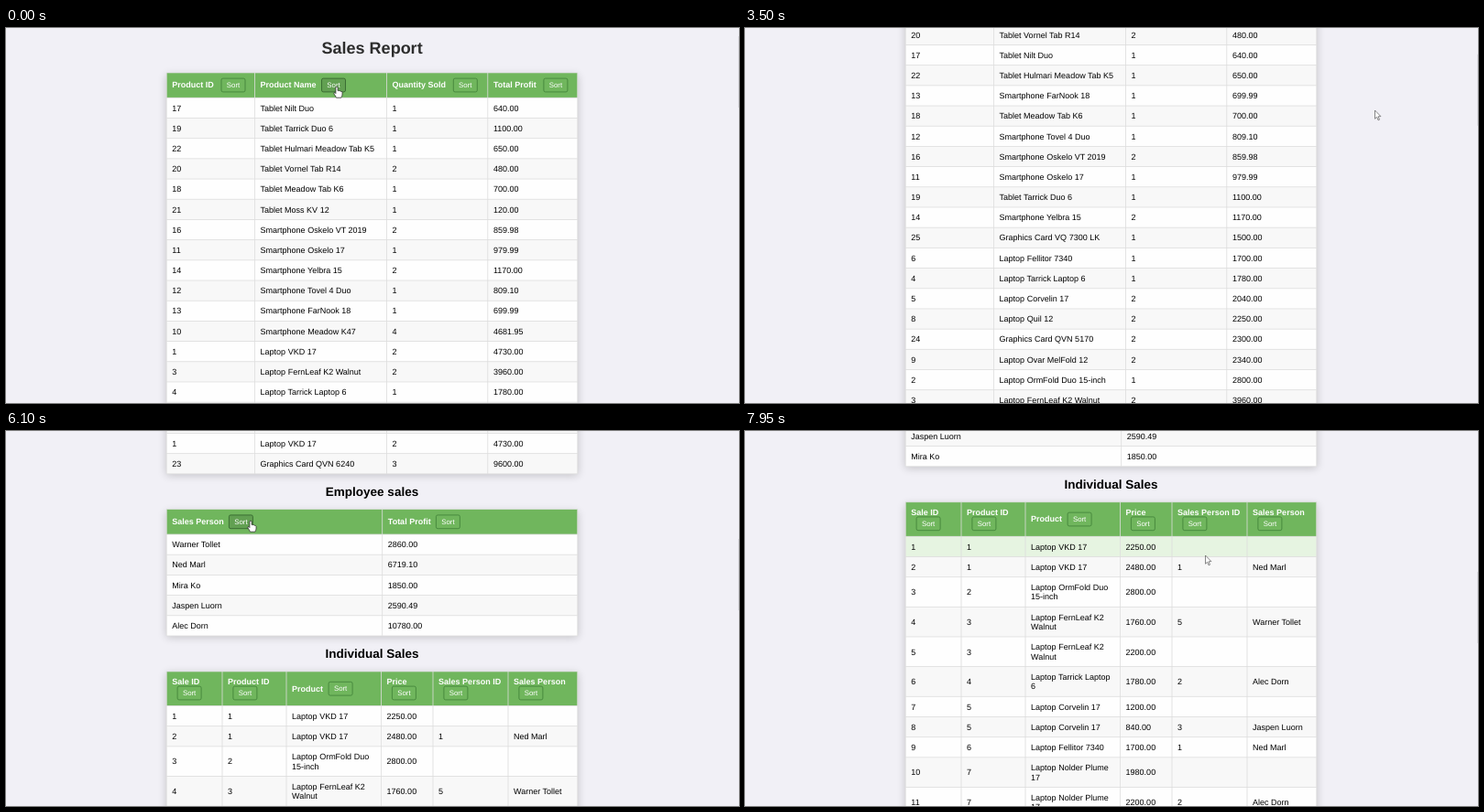
Animation of 800 by 410 pixels, one loop 8000 ms. Source, as an HTML page with a canvas:

```html
<!DOCTYPE html>
<html lang="en">
<head>
<meta charset="utf-8">
<title>Sales Report</title>
<style>
  html, body { margin: 0; width: 100%; height: 100%; overflow: hidden; background: #f1f0f6; }
  canvas { display: block; width: 800px; height: 410px; }
</style>
</head>
<body>
<canvas id="stage"></canvas>
<script>
const W = 800, H = 410, LOOP = 8000;
const ROW = 22.19, TALL = 32.65, LINE = 10.4, PAD = 6.1;
const BTN_W = 26.6, BTN_H = 15.4;
const FONT = 'Arial, "Liberation Sans", sans-serif';
const GREEN = '#70b65d';

const canvas = document.getElementById('stage');
const dpr = window.devicePixelRatio || 1;
canvas.width = W * dpr;
canvas.height = H * dpr;
const ctx = canvas.getContext('2d');

// id, name, quantity, profit; in order of name
const products = [
  [24, 'Graphics Card QVN 5170', 2, 2300],
  [23, 'Graphics Card QVN 6240', 3, 9600],
  [25, 'Graphics Card VQ 7300 LK', 1, 1500],
  [9, 'Laptop Ovar MelFold 12', 2, 2340],
  [8, 'Laptop Quil 12', 2, 2250],
  [6, 'Laptop Fellitor 7340', 1, 1700],
  [2, 'Laptop OrmFold Duo 15-inch', 1, 2800],
  [5, 'Laptop Corvelin 17', 2, 2040],
  [7, 'Laptop Nolder Plume 17', 2, 4180],
  [4, 'Laptop Tarrick Laptop 6', 1, 1780],
  [3, 'Laptop FernLeaf K2 Walnut', 2, 3960],
  [1, 'Laptop VKD 17', 2, 4730],
  [10, 'Smartphone Meadow K47', 4, 4681.95],
  [13, 'Smartphone FarNook 18', 1, 699.99],
  [12, 'Smartphone Tovel 4 Duo', 1, 809.1],
  [14, 'Smartphone Yelbra 15', 2, 1170],
  [11, 'Smartphone Oskelo 17', 1, 979.99],
  [16, 'Smartphone Oskelo VT 2019', 2, 859.98],
  [21, 'Tablet Moss KV 12', 1, 120],
  [18, 'Tablet Meadow Tab K6', 1, 700],
  [20, 'Tablet Vornel Tab R14', 2, 480],
  [22, 'Tablet Hulmari Meadow Tab K5', 1, 650],
  [19, 'Tablet Tarrick Duo 6', 1, 1100],
  [17, 'Tablet Nilt Duo', 1, 640]
];

// name, profit, id; in order of name
const staff = [
  ['Alec Dorn', 10780, 2],
  ['Jaspen Luorn', 2590.49, 3],
  ['Mira Ko', 1850, 4],
  ['Ned Marl', 6719.1, 1],
  ['Warner Tollet', 2860, 5]
];

// product id, price, seller id
const sales = [
  [1, 2250], [1, 2480, 1], [2, 2800], [3, 1760, 5], [3, 2200], [4, 1780, 2],
  [5, 1200], [5, 840, 3], [6, 1700, 1], [7, 1980], [7, 2200, 2]
];

const sortBy = (list, key) => [...list].sort((a, b) => a[key] - b[key]);
const reversed = list => [...list].reverse();
const money = n => n.toFixed(2);

const byQuantity = sortBy(products, 2);
const productOrder = [
  [0, reversed(products)], [250, products], [1850, byQuantity], [2700, sortBy(byQuantity, 3)]
];

const byProfit = sortBy(staff, 1);
const staffOrder = [
  [0, byProfit], [4950, reversed(byProfit)], [5580, staff], [5950, reversed(staff)],
  [6550, byProfit], [6700, reversed(byProfit)]
];

const saleRows = sales.map(([pid, price, sid], i) => {
  let name = products.find(p => p[0] === pid)[1];
  if (name.length > 21) name = name.replace(/ (\S+)$/, '\n$1');
  const seller = staff.find(s => s[2] === sid);
  return [i + 1, pid, name, money(price), sid || '', seller ? seller[0] : ''];
});

const scrollKeys = [
  [0, 0], [3300, 0], [3850, 337.3], [4000, 337.3], [4420, 562],
  [7450, 562], [7500, 564], [7950, 747.2]
];

const pointerKeys = [
  [0, 361, 64], [400, 361, 64], [1350, 501, 64], [1850, 501, 64], [2550, 606.5, 65],
  [3050, 606.5, 65], [3450, 687.5, 90], [4250, 687.5, 90], [4750, 477, 95], [5000, 477, 95],
  [5500, 251, 94], [5750, 257, 94], [5950, 257, 94], [6100, 267, 98], [6500, 485, 97],
  [6680, 485, 97], [7400, 575, 139], [7500, 575, 139], [7950, 502.5, 136]
];

// eased value(s) between the keys around t
function tween(keys, t) {
  let i = 0;
  while (i < keys.length - 1 && keys[i + 1][0] <= t) i++;
  const a = keys[i], b = keys[i + 1] || a;
  const u = b === a ? 0 : (t - a[0]) / (b[0] - a[0]);
  const e = u * u * (3 - 2 * u);
  return a.slice(1).map((v, k) => v + (b[k + 1] - v) * e);
}

const current = (steps, t) => steps.filter(s => s[0] <= t).pop()[1];

function text(str, x, y, size, color, bold, align = 'left') {
  ctx.font = `${bold ? 'bold ' : ''}${size}px ${FONT}`;
  ctx.fillStyle = color;
  ctx.textAlign = align;
  ctx.fillText(str, x, y);
}

function fill(color, x, y, w, h) {
  ctx.fillStyle = color;
  ctx.fillRect(x, y, w, h);
}

const inside = (p, x, y, w, h) => p.x >= x && p.x < x + w && p.y >= y && p.y < y + h;

function button(x, midY, p) {
  const y = midY - BTN_H / 2;
  const hover = inside(p, x, y, BTN_W, BTN_H);
  if (hover) p.hand = true;
  ctx.beginPath();
  ctx.roundRect(x + 0.3, y + 0.3, BTN_W - 0.6, BTN_H - 0.6, 1.8);
  ctx.fillStyle = hover ? '#62a052' : GREEN;
  ctx.fill();
  ctx.lineWidth = 0.8;
  ctx.strokeStyle = hover ? '#2f5f2a' : '#3f7f38';
  ctx.stroke();
  text('Sort', x + BTN_W / 2, midY + 2.7, 7.87, '#fff', false, 'center');
}

// heads: [label, label y, button x, button y]
function table(cols, top, headH, heads, rows, p) {
  const left = cols[0], right = cols[cols.length - 1], width = right - left;
  const heights = rows.map(r => r.some(c => String(c).includes('\n')) ? TALL : ROW);
  const height = headH + heights.reduce((a, b) => a + b, 0);

  ctx.save();
  ctx.shadowColor = 'rgba(0,0,0,.2)';
  ctx.shadowBlur = 9 * dpr;
  ctx.shadowOffsetY = 2.2 * dpr;
  fill('#fff', left, top, width, height);
  ctx.restore();

  fill(GREEN, left, top, width, headH);
  let y = top + headH;
  rows.forEach((row, i) => {
    const h = heights[i];
    const hover = inside(p, left, y, width, h);
    fill(hover ? '#e6f4e1' : i % 2 ? '#f8f8f8' : '#fefefe', left, y, width, h);
    fill('#ddd', left, y - 0.4, width, 0.8);
    row.forEach((cell, c) => {
      const lines = String(cell).split('\n');
      lines.forEach((line, k) => {
        const off = (k - (lines.length - 1) / 2) * LINE;
        text(line, cols[c] + PAD, y + h / 2 + 3.2 + off, 9, '#000');
      });
    });
    y += h;
  });
  for (const x of cols) fill('#ddd', x - 0.4, top, 0.8, height);
  fill('#ddd', left, top - 0.3, width, 0.6);
  fill('#ddd', left, y - 0.4, width, 0.8);

  heads.forEach(([label, midY, bx, by], c) => {
    text(label, cols[c] + PAD, midY + 3.1, 9, '#fff', true);
    button(bx, by, p);
  });
}

const line = (y, ...pairs) => pairs.map(([label, x]) => [label, y, x, y + 0.3]);

const productCols = [175.2, 271.5, 415.4, 525.8, 623.8];
const productHeads = line(62.2, ['Product ID', 234.7], ['Product Name', 344.2],
  ['Quantity Sold', 488], ['Total Profit', 586.6]);

const staffCols = [175.2, 410.7, 623.8];
const staffHeads = line(661, ['Sales Person', 243.1], ['Total Profit', 469.1]);

const saleCols = [175.2, 236, 306, 409.5, 466, 548, 623.8];
const saleHeads = ['Sale ID', 'Product ID', 'Product', 'Price', 'Sales Person ID', 'Sales Person']
  .map((label, c) => label === 'Product'
    ? [label, 843.5, 351.8, 843.7]
    : [label, 835.6, saleCols[c] + 11.6, 848.5]);

const handPath = new Path2D('M-1.1 .8Q0-.6 1.1 .8V4.5Q2 3.8 2.8 4.8Q3.8 4.3 4.5 5.4Q5.6 5 6 6.4V9' +
  'Q5.8 10.5 4.8 12.2H-.5Q-1.5 10-3.2 7.8Q-3.4 6.3-1.9 6.8L-1.1 7.6Z');
const arrowPath = new Path2D('M0 0V9.2L2.1 7.3L3.6 10.8L5 10.2L3.5 6.8L6.4 6.6Z');

function pointer(x, y, hand) {
  const path = hand ? handPath : arrowPath;
  ctx.save();
  ctx.translate(x, y);
  ctx.lineJoin = 'round';
  ctx.lineWidth = 0.7;
  ctx.fillStyle = '#fff';
  ctx.strokeStyle = hand ? '#222' : '#555';
  ctx.fill(path);
  ctx.stroke(path);
  ctx.restore();
}

function draw(t) {
  const [scroll] = tween(scrollKeys, t);
  const [px, py] = tween(pointerKeys, t);
  const p = { x: px, y: py + scroll, hand: false };

  ctx.setTransform(dpr, 0, 0, dpr, 0, 0);
  ctx.textRendering = 'geometricPrecision';
  fill('#f1f0f6', 0, 0, W, H);

  ctx.save();
  ctx.translate(0, -scroll);
  text('Sales Report', 399.6, 27.8, 18, '#2d2d2d', true, 'center');
  table(productCols, 49, 27.3, productHeads,
    current(productOrder, t).map(([id, name, n, sum]) => [id, name, n, money(sum)]), p);
  text('Employee sales', 399.5, 633.1, 13.5, '#000', true, 'center');
  table(staffCols, 647.6, 27.4, staffHeads,
    current(staffOrder, t).map(([name, sum]) => [name, money(sum)]), p);
  text('Individual Sales', 399.5, 810.1, 13.5, '#000', true, 'center');
  table(saleCols, 825, 37.5, saleHeads, saleRows, p);
  ctx.restore();

  fill('#dcdbe1', 799, 9 + scroll * 0.194, 1, 78);
  pointer(px, py, p.hand);
}

function tick() {
  draw(performance.now() % LOOP);
  requestAnimationFrame(tick);
}
tick();
</script>
</body>
</html>
```
